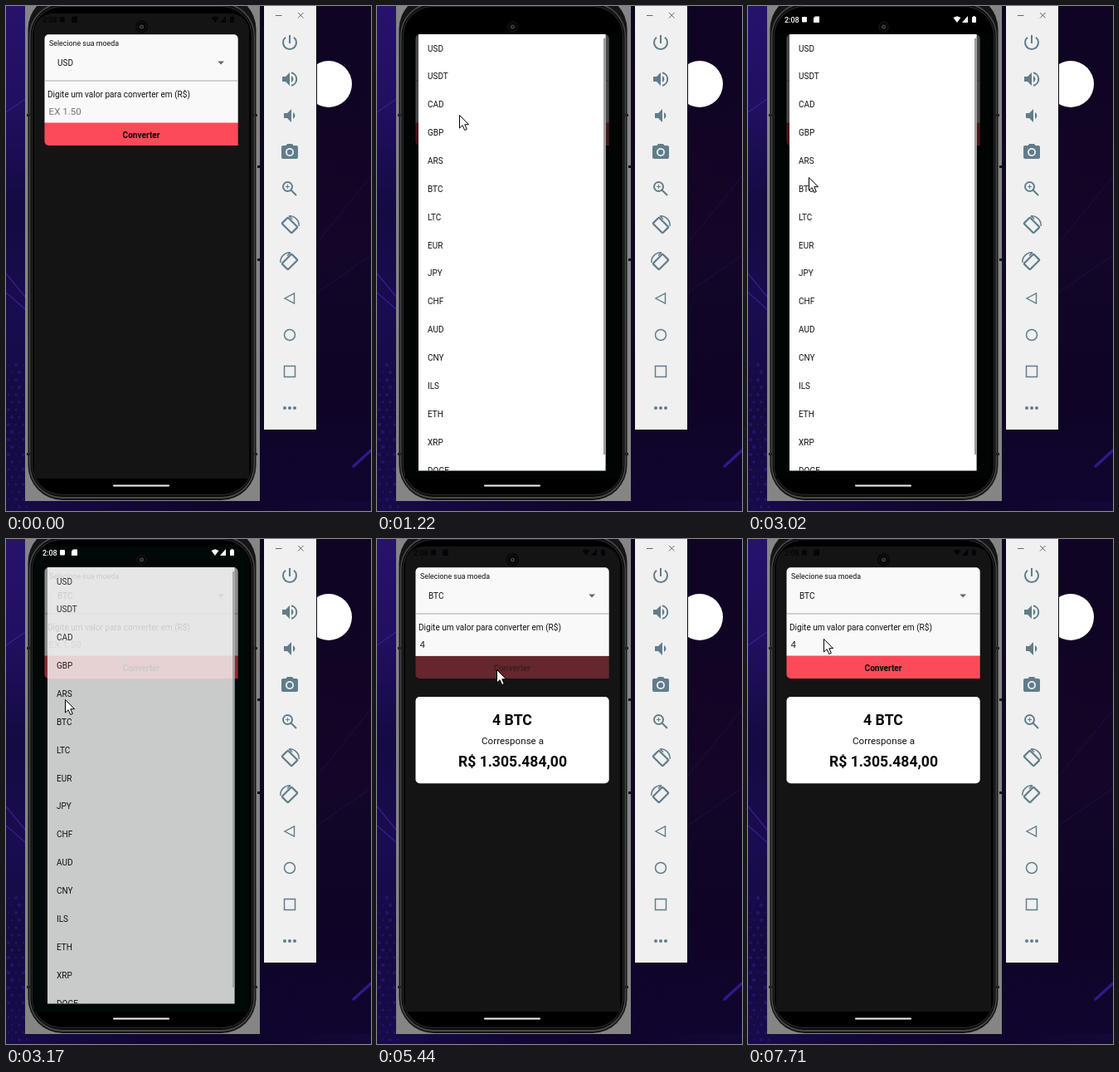
These frames come from a looping animation (440 by 608 pixels, 8 s). An HTML page with a canvas:

```html
<!DOCTYPE html>
<html lang="pt-BR">
<head>
<meta charset="utf-8">
<title>Conversor de moedas</title>
<style>
  html, body { margin: 0; width: 100%; height: 100%; overflow: hidden; background: #0d0524; }
  canvas { display: block; width: 440px; height: 608px; }
</style>
</head>
<body>
<canvas id="stage" width="440" height="608"></canvas>
<script>
const W = 440, H = 608, LOOP = 8000;
const stage = document.getElementById('stage').getContext('2d');
const FONT = 'Roboto, "Open Sans", sans-serif';
const SLATE = '#607d8b', RED = '#fd4a59', DARK = '#141414';
const COINS = 'USD USDT CAD GBP ARS BTC LTC EUR JPY CHF AUD CNY ILS ETH XRP DOGE'.split(' ');

// Pointer path: time, x, y
const PATH = [
  [120, 269, 401], [400, 170, 250], [640, 71, 100], [870, 97, 64], [1010, 97, 64],
  [1086, 99, 107], [1224, 99, 131], [1500, 88, 175], [1770, 78, 197], [2200, 69, 216],
  [2600, 74, 207], [3018, 73, 206], [3160, 71, 192], [3450, 80, 86], [3700, 120, 105],
  [3940, 119, 125], [4480, 119, 125], [4900, 128, 134], [5225, 144, 157], [5790, 144, 157],
  [6000, 238, 205], [6180, 200, 300], [6390, 40, 250], [6620, 166, 122], [6900, 122, 102],
  [7180, 91, 120], [8000, 91, 120]
];

const clamp = v => Math.max(0, Math.min(1, v));
const ramp = (t, a, b) => clamp((t - a) / (b - a));
const within = (t, a, b) => t >= a && t < b;

function layer(draw) {
  const c = document.createElement('canvas');
  c.width = W; c.height = H;
  draw(c.getContext('2d'));
  return c;
}

function rect(g, x, y, w, h, color, r = 0) {
  g.fillStyle = color;
  g.beginPath();
  g.roundRect(x, y, w, h, r);
  g.fill();
}

function poly(g, pts, color) {
  g.fillStyle = color;
  g.beginPath();
  for (let i = 0; i < pts.length; i += 2) g.lineTo(pts[i], pts[i + 1]);
  g.closePath();
  g.fill();
}

function disc(g, x, y, r, color) {
  g.fillStyle = color;
  g.beginPath();
  g.arc(x, y, r, 0, 7);
  g.fill();
}

function line(g, d, color, width) {
  g.strokeStyle = color;
  g.lineWidth = width;
  g.stroke(new Path2D(d));
}

function text(g, s, x, y, size, color = '#111', weight = 400, align = 'left') {
  g.font = `${weight} ${size}px ${FONT}`;
  g.textAlign = align;
  g.fillStyle = color;
  g.fillText(s, x, y);
}

// Evenly spaced colour stops from (0, 0) to (x, y)
function shade(g, x, y, colors) {
  const s = g.createLinearGradient(0, 0, x, y);
  colors.forEach((c, i) => s.addColorStop(i / (colors.length - 1), c));
  return s;
}

function wallpaper(g) {
  rect(g, 0, 0, W, H, shade(g, 0, H, ['#0f0423', '#110424', '#130628', '#0f0425', '#100530']));
  rect(g, 0, 0, 24, H, shade(g, 0, H, ['#27126c', '#210f60', '#150a42', '#1a0c50', '#150a42', '#180b4a']));
  rect(g, 0, 596, W, 12, shade(g, W, 0, ['#180b4a', '#130638', '#0f042a', '#140838']));

  line(g, 'M0 128L23 112M0 345L23 365M0 322L23 350', '#3a1e8c', 1.2);
  line(g, 'M375 345L440 300M375 285L440 205', 'rgba(70,36,160,.25)', 1);
  g.lineCap = 'round';
  line(g, 'M419 554L440 535', '#30188c', 3.5);
  g.lineCap = 'butt';

  for (let y = 432; y < H; y += 9) {
    for (let x = 3; x < 24; x += 9) {
      disc(g, x + y % 2 * 4, y, 1.6 + .7 * Math.sin(y / 30 + x), '#27126a');
    }
  }
  disc(g, 389, 94, 28, '#fff');
}

function phone(g) {
  rect(g, 23, 0, 283, 596, '#858585');
  rect(g, 26.5, -14, 275, 609, '#151515', 42);
  rect(g, 28, -4, 272, 597, '#484848', 40);
  rect(g, 29.5, -2, 269, 593, '#0a0a0a', 38);
  rect(g, 31, 0, 266, 589, '#2c2c2c', 36);
  rect(g, 32, 1, 264, 587, '#000', 35);
  for (const y of [130, 538]) {
    rect(g, 25, y, 4, 3, '#222');
    rect(g, 299, y, 4, 3, '#222');
  }
  rect(g, 303, 192, 3, 3, '#111');
  rect(g, 303, 304, 3, 3, '#111');
  rect(g, 129, 576.4, 68, 2, '#f4f4f4', 1);
}

function turnIcon(g, y, side) {
  g.save();
  g.translate(342, y);
  g.scale(side, 1);
  g.save();
  g.rotate(-Math.PI / 4);
  g.strokeStyle = SLATE;
  g.lineWidth = 2.2;
  g.beginPath();
  g.roundRect(-5.2, -8.3, 10.4, 16.6, 1);
  g.stroke();
  g.restore();
  line(g, 'M-1 -11.2A11.5 11.5 0 0 1 11.2 1M-1 -11.2L3 -7.5', SLATE, 1.5);
  g.restore();
}

function toolbar(g) {
  rect(g, 310, 0, 65, 511, '#08040f');
  rect(g, 311, 0, 63, 510, '#f0f0f0');
  line(g, 'M325 11.5h7.5M352 8l6.5 6.5M358.5 8l-6.5 6.5', '#666', 1);

  const at = (y, draw) => {
    g.save();
    g.translate(342, y);
    draw();
    g.restore();
  };
  const speaker = x => poly(g, [x, -3, x + 4, -3, x + 9, -8, x + 9, 8, x + 4, 3, x, 3], SLATE);
  const wave = x => g.fill(new Path2D(`M${x} -4A4.5 4.5 0 0 1 ${x} 4Z`));

  at(44, () => line(g, 'M0 -9V1M-5 -6.2A8 8 0 1 0 5 -6.2', SLATE, 2));
  at(88, () => {
    speaker(-9);
    wave(2);
    line(g, 'M2 -7.8A8 8 0 0 1 2 7.8', SLATE, 2);
  });
  at(132, () => { speaker(-7); wave(4); });
  at(176, () => {
    poly(g, [-3, -10, 3, -10, 5, -7.5, -5, -7.5], SLATE);
    rect(g, -10, -8, 20, 16, SLATE, 2);
    disc(g, 0, 0, 5, '#f0f0f0');
    disc(g, 0, 0, 3.2, SLATE);
  });
  at(220, () => {
    line(g, 'M3 -2.5A5.5 5.5 0 1 1 -8 -2.5A5.5 5.5 0 1 1 3 -2.5M1.5 1.5L8 8', SLATE, 2);
    line(g, 'M-5 -2.5h5M-2.5 -5v5', SLATE, 1);
  });
  turnIcon(g, 264, 1);
  turnIcon(g, 308, -1);
  at(352, () => line(g, 'M5.5 -6V6L-6 0Z', SLATE, 1.4));
  at(396, () => line(g, 'M6.5 0A6.5 6.5 0 1 1 -6.5 0A6.5 6.5 0 1 1 6.5 0', SLATE, 1.5));
  at(440, () => line(g, 'M-6.5 -6.5H6.5V6.5H-6.5Z', SLATE, 1.5));
  at(484, () => [-6, 0, 6].forEach(x => disc(g, x, 0, 2, SLATE)));
}

function dropdown(g) {
  g.beginPath();
  g.rect(50, 34, 225.6, 525.6);
  g.clip();
  rect(g, 50, 34, 226, 526, '#fff');
  COINS.forEach((name, i) => text(g, name, 61, 54.6 + i * 33.86, 10));
}

function statusBar(g, color) {
  text(g, '2:08', 44, 19.5, 9, color, 500);
  rect(g, 65, 13, 6, 6.5, color, 1);
  poly(g, [81, 12.5, 86, 12.5, 86, 20, 79, 20, 79, 14.5], color);
  poly(g, [247.5, 14, 252, 12.3, 256.5, 14, 252, 20], color);
  poly(g, [265, 12, 265, 20, 258, 20], color);
  rect(g, 270, 13, 5, 7, color, .8);
  rect(g, 271.5, 12, 2, 1, color);
}

function form(g, t) {
  const typed = t >= 4690;
  rect(g, 46.5, 34.3, 233.2, 106.7, '#f9f9f9', [5, 5, 0, 0]);
  text(g, 'Selecione sua moeda', 52, 48.2, 8.85);
  text(g, t < 3150 ? 'USD' : 'BTC', 62, 72, 10);
  poly(g, [255.2, 66.5, 263, 66.5, 259.1, 70.5], '#666');
  rect(g, 46.5, 89.5, 233.2, 1, '#a8a8a8');
  text(g, 'Digite um valor para converter em (R$)', 50, 110, 10.05);
  text(g, typed ? '4' : 'EX 1.50', 51.6, 131, 11.5, typed ? '#222' : '#747474');

  if (within(t, 3900, 4460) || within(t, 4690, 5200) || within(t, 7160, 7700)) {
    rect(g, typed ? 58 : 51, 118, 1, 17, '#0a8577');
  }

  g.globalAlpha = t < 5400 ? 1 - .8 * ramp(t, 5240, 5360) : .2 + .8 * ramp(t, 5385, 5640);
  rect(g, 46.5, 140.5, 233.2, 27.5, RED, [0, 0, 0, 5]);
  text(g, 'Converter', 163, 158.8, 10.1, '#0a0a0a', 700, 'center');
  g.globalAlpha = 1;
}

function result(g) {
  rect(g, 46.5, 190, 233.2, 104.2, '#fff', 5);
  text(g, '4 BTC', 163, 224, 17.7, '#0a0a0a', 700, 'center');
  text(g, 'Corresponse a', 163.5, 246.5, 11.6, '#111', 400, 'center');
  text(g, 'R$ 1.305.484,00', 163.5, 274, 17.6, '#0a0a0a', 700, 'center');
}

function lens(g) {
  disc(g, 163.5, 25, 7.5, '#050505');
  line(g, 'M169 25a5.5 5.5 0 1 1 -11 0a5.5 5.5 0 1 1 11 0', '#191919', 1);
  disc(g, 163.5, 25, 2.6, '#444');
  disc(g, 163.5, 25, 1.2, '#151515');
}

function pointer(g, x, y) {
  g.save();
  g.translate(x + .5, y + .5);
  const arrow = new Path2D('M0 0V15.5L3.6 12.2L6.2 18L8.8 16.9L6.3 11.2H11Z');
  g.fillStyle = '#fff';
  g.fill(arrow);
  g.strokeStyle = '#000';
  g.lineWidth = 1;
  g.stroke(arrow);
  g.restore();
}

// Slope at a key; zero beside a rest
function slope(i, k) {
  const a = PATH[i - 1], b = PATH[i], c = PATH[i + 1];
  const still = (p, q) => p[1] === q[1] && p[2] === q[2];
  if (!a || !c || still(a, b) || still(b, c)) return 0;
  return (c[k] - a[k]) / (c[0] - a[0]);
}

function pointerAt(t) {
  let i = 0;
  while (i < PATH.length - 2 && t >= PATH[i + 1][0]) i++;
  const a = PATH[i], b = PATH[i + 1], d = b[0] - a[0], u = clamp((t - a[0]) / d);
  return [1, 2].map(k => Math.round(
    a[k] + (b[k] - a[k]) * u * u * (3 - 2 * u)
    + d * u * (1 - u) * (slope(i, k) * (1 - u) - slope(i + 1, k) * u)));
}

const backdrop = layer(g => { wallpaper(g); phone(g); toolbar(g); });
const menu = layer(dropdown);

function render(t) {
  const g = stage;
  const open = ramp(t, 1030, 1164) * (1 - ramp(t, 3120, 3290));
  const veil = color => rect(g, 34, 9, 259, 560, color, [22, 22, 0, 0]);
  g.drawImage(backdrop, 0, 0);

  // The page darkens sooner than the cards on it
  veil(DARK);
  veil(`rgba(0,16,15,${ramp(open, 0, .4)})`);
  form(g, t);
  if (t >= 5400) result(g);

  const lit = within(t, 1290, 3200);
  if (!lit) statusBar(g, '#04040a');
  if (open > 0) {
    veil(`rgba(0,0,0,${.7 * open * open})`);
    if (open === 1) rect(g, 34, 9, 259, 25, '#000', [22, 22, 0, 0]);
    g.globalAlpha = open;
    g.drawImage(menu, 0, 0);
    const bar = 1 - ramp(t, 1850, 2050) + ramp(t, 2480, 2580);
    g.globalAlpha = open * bar;
    rect(g, 273, 39, 2.6, 501, '#999');
    g.globalAlpha = 1;
  }
  if (lit) statusBar(g, '#fff');
  lens(g);
  if (t >= 120) pointer(g, ...pointerAt(t));
}

function tick(now) {
  const t = now % LOOP;
  render(120 + 69 * Math.floor((t - 108) / 69));
  requestAnimationFrame(tick);
}
requestAnimationFrame(tick);
</script>
</body>
</html>
```
